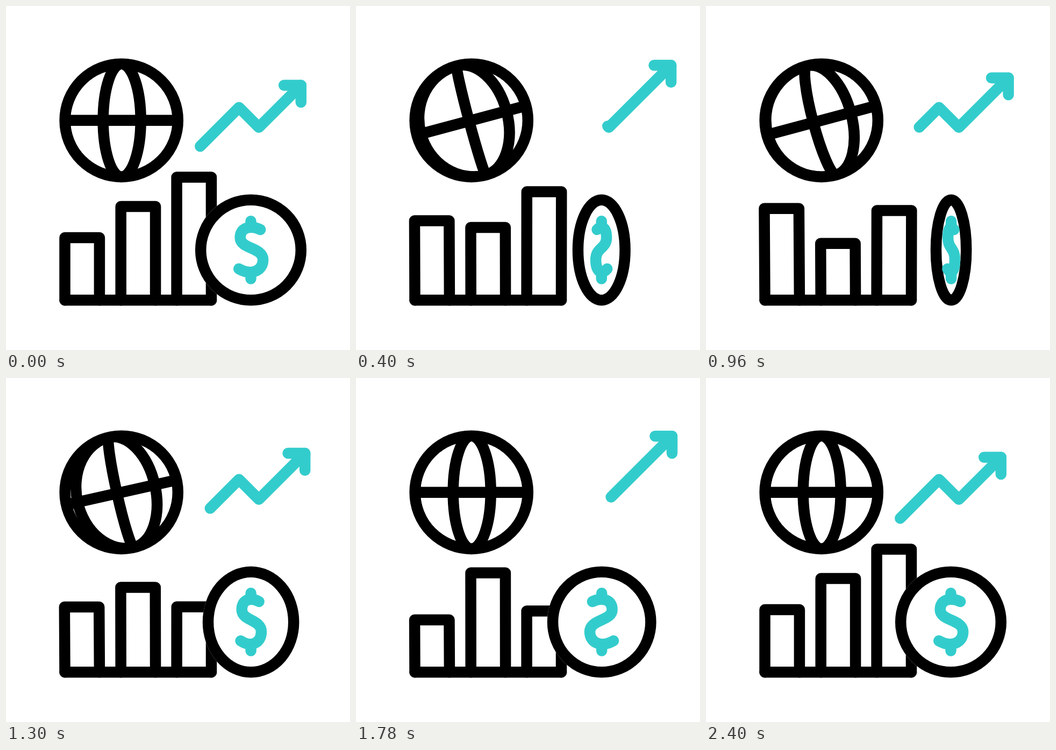
Animation, 640 px wide and 640 px high, one loop 2.42 s. Source, as an HTML page with a canvas:

```html
<!DOCTYPE html>
<html lang="en">
<head>
<meta charset="utf-8">
<title>Global growth</title>
<style>
  html, body { margin: 0; width: 100%; height: 100%; overflow: hidden; background: #fff; }
  canvas { display: block; width: 640px; height: 640px; }
</style>
</head>
<body>
<canvas id="stage" width="640" height="640"></canvas>
<script>
const ctx = document.getElementById('stage').getContext('2d');
const LOOP = 2420, STEP = 20;
const BLACK = '#000', TEAL = '#33cccc';

const clamp = v => Math.min(1, Math.max(0, v));
const mix = (a, b, k) => a + (b - a) * k;
const smooth = p => { p = clamp(p); return p * p * (3 - 2 * p); };
const ramp = (t, from, to) => smooth((t - from) / (to - from));

// Leaves like an easy ease, arrives very softly: cubic-bezier(1/3, 0, 0, 1).
function softLanding(p) {
  let lo = 0, hi = 1;
  for (let i = 0; i < 24; i++) {
    const u = (lo + hi) / 2;
    if ((1 - u) ** 2 * u + u ** 3 < p) lo = u; else hi = u;
  }
  return 3 * (1 - lo) * lo * lo + lo ** 3;
}

// Eased values spaced evenly in time.
function track(t, span, values) {
  const i = Math.min(values.length - 2, Math.floor(t / span));
  return mix(values[i], values[i + 1], smooth(t / span - i));
}

function polyline(points) {
  ctx.beginPath();
  points.forEach(([x, y]) => ctx.lineTo(x, y));
}

function stroke(color) {
  ctx.strokeStyle = color;
  ctx.stroke();
}

function drawGlobe(t) {
  const R = 105.1;
  const tilt = -15 * (ramp(t, 0, 400) - ramp(t, 1200, 1600));
  const turns = 4 * ramp(t, 53, 1703);
  const turn = Math.min(3, Math.floor(turns));
  const f = turns >= 4 ? 0 : turns - turn;
  const entryLag = [2.8, 1.4, 3, 1.3][turn];

  ctx.save();
  ctx.translate(214.7, 212.8);
  ctx.beginPath();
  ctx.arc(0, 0, R, 0, 2 * Math.PI);
  stroke(BLACK);
  ctx.clip();
  ctx.rotate(tilt * Math.PI / 180);
  polyline([[-R, 0], [R, 0]]);
  stroke(BLACK);

  const meridians = [
    -R + (R - 34) * f ** entryLag,
    -34 + 70 * f ** 1.1,
    36 + (R - 36) * f
  ];
  for (const u of meridians) {
    ctx.beginPath();
    ctx.ellipse(0, 0, Math.abs(u), R, 0, -Math.PI / 2, Math.PI / 2, u < 0);
    stroke(BLACK);
  }
  ctx.restore();
}

const bars = [
  { x: 109.5, tops: [431, 368, 452.8, 431], lean: [0, -1.1, -0.5, 0] },
  { x: 213.7, tops: [373, 451, 361, 373], lean: [0, -0.5, -0.2, 0] },
  { x: 317.6, tops: [318.6, 372.5, 450.5, 318.6], lean: [0, 0.4, 0, 0] }
];

function drawBars(t) {
  const base = 547.2, width = 64.4;
  for (const { x, tops, lean } of bars) {
    const y = track(t, 800, tops), dx = track(t, 800, lean);
    polyline([[x, base], [x + dx, y], [x + width + dx, y], [x + width, base]]);
    stroke(BLACK);
  }
  polyline([[109.5, base], [382, base]]);
  stroke(BLACK);
}

function drawArrow(t) {
  const p = (t % 1200) / 600;
  const e = p < 1 ? softLanding(p) : 1 - smooth(p - 1);
  const d = 39.2 * e;
  const tip = [548.8 + d, 147.5 - d];
  const path = [[361.3, 261], [433.5, 188.8], [470.4, 225.7], tip];

  // All legs run at 45 degrees, so x alone measures the trimmed part.
  const cut = path[0][0] + e / 2 * (tip[0] - path[0][0]);
  const i = path.findIndex(([x]) => x > cut);
  const [a, b] = [path[i - 1], path[i]];
  const tail = [cut, mix(a[1], b[1], (cut - a[0]) / (b[0] - a[0]))];
  polyline([tail, ...path.slice(i)]);
  stroke(TEAL);
  polyline([[tip[0] - 31.6, tip[1]], tip, [tip[0], tip[1] + 31.6]]);
  stroke(TEAL);
}

function drawCoin(t) {
  const R = 93.3, cy = 454;
  const rx = track(t, 600, [R, -91.8, R, -91.8, R]);
  const cx = track(t, 600, [455.5, 457.2, 455.5, 457.2, 455.5]);

  ctx.beginPath();
  ctx.ellipse(cx, cy, Math.abs(rx), R, 0, 0, 2 * Math.PI);
  ctx.fillStyle = '#fff';
  ctx.fill();
  stroke('#fff');
  stroke(BLACK);

  // Only the path is squeezed; the line keeps its weight.
  ctx.save();
  ctx.translate(cx, cy);
  ctx.scale(rx / R, 1);
  ctx.translate(-455.3, -cy);
  ctx.beginPath();
  ctx.moveTo(473, 416);
  ctx.bezierCurveTo(459, 409, 435.5, 409, 435.5, 431);
  ctx.bezierCurveTo(435.5, 452, 478, 449, 478, 472);
  ctx.bezierCurveTo(478, 493, 456, 502, 433, 489);
  ctx.moveTo(455.3, 400.3);
  ctx.lineTo(455.3, 411);
  ctx.moveTo(455.3, 496);
  ctx.lineTo(455.3, 507.6);
  ctx.restore();
  stroke(TEAL);
}

function render(now) {
  const t = Math.min(2400, Math.floor((now % LOOP) / STEP) * STEP);
  ctx.fillStyle = '#fff';
  ctx.fillRect(0, 0, 640, 640);
  ctx.lineWidth = 20.5;
  ctx.lineCap = ctx.lineJoin = 'round';
  drawGlobe(t);
  drawBars(t);
  drawArrow(t);
  drawCoin(t);
}

let start;
function tick(now) {
  start ??= now;
  render(now - start);
  requestAnimationFrame(tick);
}
render(0);
requestAnimationFrame(tick);
</script>
</body>
</html>
```
